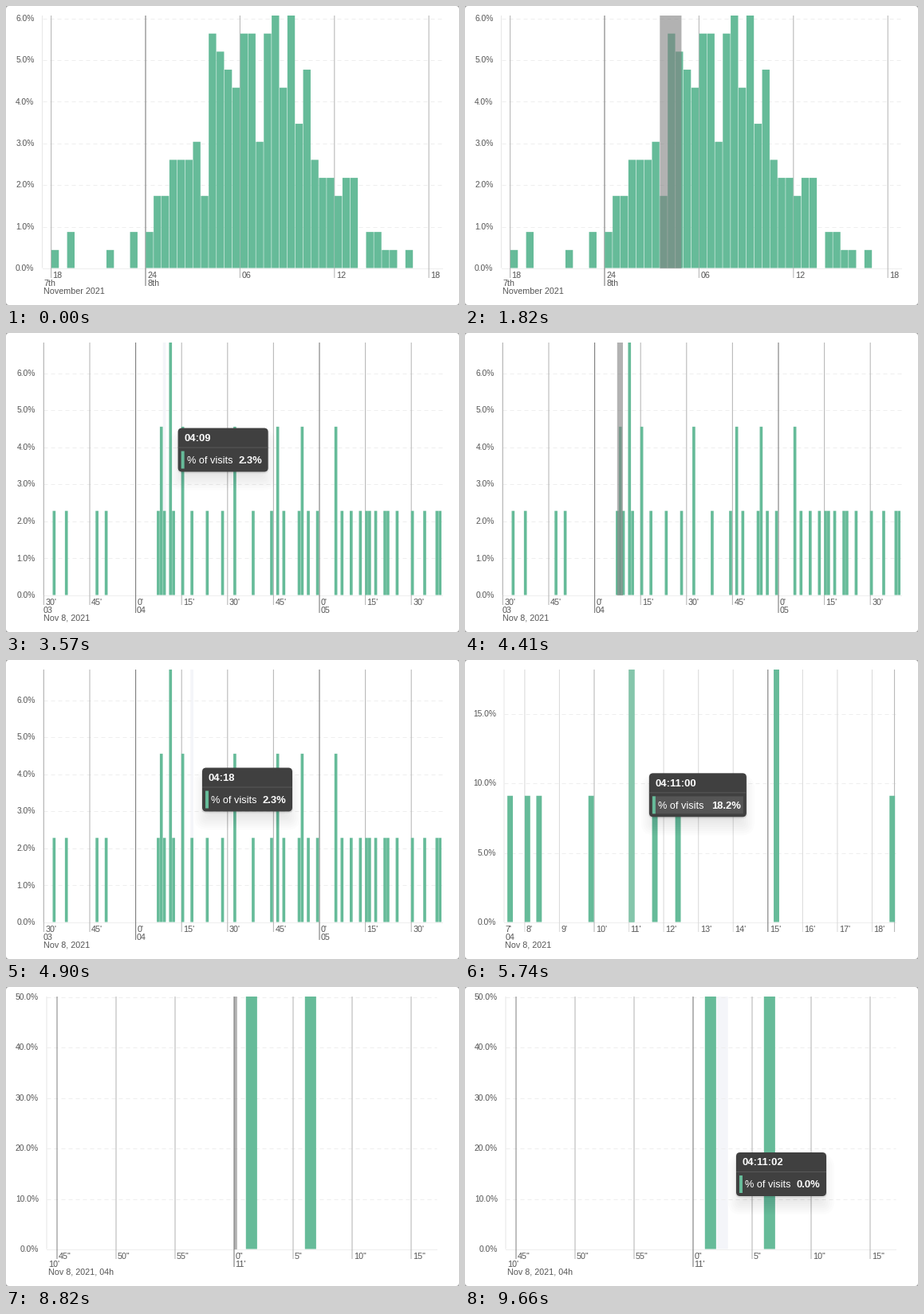
A matplotlib script that plays this animation: 568 by 376 pixels, repeating every 9940 ms.

```python
import math

import numpy as np
import matplotlib.pyplot as plt
from matplotlib.animation import FuncAnimation
from matplotlib.collections import LineCollection
from matplotlib.patches import FancyBboxPatch, Rectangle

W, H, DPI = 568, 376, 100
STEP, FRAMES = 70, 142
PX = 72 / DPI
TOP, BASE = 12, 329.5
GREEN, HOVER, BAND = "#66bb99", "#85c6ab", "#f4f5f9"
LIGHT, MID, DARK = "#dcdcdc", "#b9b9b9", "#7c7c7c"

plt.rcParams["font.family"] = "Liberation Sans"
fig = plt.figure(figsize=(W / DPI, H / DPI), dpi=DPI, facecolor="#a0a0a0")
ax = fig.add_axes([0, 0, 1, 1])
ax.set_xlim(0, W)
ax.set_ylim(H, 0)
ax.axis("off")


def rect(x, y, w, h, color, z, alpha=None):
    return ax.add_patch(Rectangle((x, y), w, h, fc=color, lw=0, zorder=z,
                                  alpha=alpha, snap=False))


def rounded(x, y, w, h, r, color, z, alpha=None):
    style = f"round,pad=0,rounding_size={r}"
    return ax.add_patch(FancyBboxPatch((x, y), w, h, boxstyle=style, fc=color,
                                       lw=0, zorder=z, alpha=alpha))


def text(x, y, s, size=10.7, color="#555555", z=6, **kw):
    return ax.text(x, y, s, fontsize=size * PX, color=color, zorder=z,
                   va="baseline", **kw)


class View:
    """One zoom level: bin 0 starts at x0, each bin is w wide and step seconds long."""

    def __init__(self, x0, w, start, step, visits, left, right, ytick, ticks, notes):
        self.x0, self.w, self.start, self.step = x0, w, start, step
        self.counts = dict(zip(*np.unique(visits, return_counts=True)))
        self.total, self.peak = len(visits), max(self.counts.values())
        self.art = [self.bar(i, GREEN, 3) for i in self.counts]
        self.draw_axes(left, right, ytick, ticks, notes)

    def draw_axes(self, left, right, ytick, ticks, notes):
        add = self.art.append
        gap = ytick / 100 * self.total / self.peak * (BASE - TOP)
        for k in range(int((BASE - TOP) / gap + 1e-6) + 1):
            y = BASE - k * gap
            add(text(left - 10, y + 3.6, f"{k * ytick:.1f}%", 10.3, ha="right"))
            add(ax.plot([left, right], [math.floor(y) + 0.5] * 2, color="#eeeeee",
                        lw=PX, ls=(0, (5, 4)) if k else "-", zorder=1)[0])
        lines = [(left, "", "#e9e9e9", BASE)] + ticks
        add(ax.add_collection(LineCollection(
            [[(x, TOP), (x, end)] for x, _, _, end in lines],
            colors=[color for _, _, color, _ in lines],
            linewidths=1.1 * PX, zorder=2, snap=False)))
        for x, label, *_ in ticks:
            add(text(x + 2, 342, label))
        for x, row, label in notes:
            add(text(x, 342 + 9.9 * row, label))

    def top(self, i):
        return BASE - (BASE - TOP) * self.counts.get(i, 0) / self.peak

    def bar(self, i, color, z):
        y = self.top(i)
        return rect(self.x0 + i * self.w, y, self.w * 0.95, BASE - y, color, z)

    def index(self, x):
        return math.floor((x - self.x0) / self.w)

    def clock(self, i):
        s = int(self.start * 60 + i * self.step) % 86400
        out = f"{s // 3600:02d}:{s // 60 % 60:02d}"
        return out if self.step >= 60 else out + f":{s % 60:02d}"

    def share(self, i):
        return f"{100 * self.counts.get(i, 0) / self.total:.1f}%"

    def show(self, on):
        for a in self.art:
            a.set_visible(on)


def tick(x, label, major, color=MID):
    return (x, label, DARK, 352) if major else (x, label, color, 342)


# Visits in ten-second bins from 04:07:30; the hour view reuses them by minute
TENS = [0, 3, 5, 14, 21, 21, 25, 29, 46, 46, 66]
OTHERS = [3, 7, 17, 20, 53, 58, 62, 62, 68, 74, 76, 76, 78, 83, 84, 84, 86, 89, 95, 95,
          97, 100, 103, 105, 106, 108, 111, 112, 115, 120, 124, 128, 129]


def day_view():
    per_bin = [1, 0, 2, 0, 0, 0, 0, 1, 0, 0, 2, 0, 2, 4, 4, 6, 6, 6, 7, 4, 13, 12, 11,
               10, 13, 13, 7, 13, 14, 10, 14, 8, 11, 6, 5, 5, 4, 5, 5, 0, 2, 2, 1, 1, 0, 1]
    visits = np.repeat(range(len(per_bin)), per_bin)
    ticks = [tick(56.6 + 118.4 * k, f"{(12 + 6 * k) % 24 + 6:02d}", k == 1)
             for k in range(5)]
    notes = [(47, 1, "7th"), (177, 1, "8th"), (47, 2, "November 2021")]
    return View(56.9, 9.865, 18 * 60, 1800, visits, 45.5, 547, 1, ticks, notes)


def hour_view():
    visits = OTHERS + [(225 + i) // 6 for i in TENS]
    ticks = [tick(47.4 + 57.6 * k, f"{(30 + 15 * k) % 60}'", k % 4 == 2)
             for k in range(9)]
    notes = [(47, 1, "03"), (164, 1, "04"), (394.5, 1, "05"), (47, 2, "Nov 8, 2021")]
    return View(47, 3.84, 210, 60, visits, 47, 547, 1, ticks, notes)


def minute_view():
    ticks = [(162 + 43.56 * (m - 10), f"{m}'", {10: MID, 15: DARK}.get(m, LIGHT), 342)
             for m in range(8, 19)]
    ticks.append((538.5, "", MID, 342))
    notes = [(50.5, 0, "7'"), (50.5, 1, "04"), (50.5, 2, "Nov 8, 2021")]
    return View(53.1, 7.26, 247.5, 10, TENS, 49, 540, 5, ticks, notes)


def second_view():
    ticks = [tick(64 + 74 * k, f'{(45 + 5 * k) % 60}"', k == 3, MID if k else "#8c8c8c")
             for k in range(7)]
    notes = [(53, 1, "10'"), (287.5, 1, "11'"), (53, 2, "Nov 8, 2021, 04h")]
    return View(286, 14.8, 251, 1, [1, 6], 51, 540, 10, ticks, notes)


class Stage:
    """Hover with a tooltip, drag a brush, release, then zoom into the next view."""

    def __init__(self, view, hover, move, hide, press, release, zoom, path):
        self.view, self.hover, self.move, self.hide = view, hover, move, hide
        self.press, self.release, self.zoom = press, release, zoom
        self.path = np.array(path)

    def pointer(self, t):
        a, b, c = self.path
        if t < self.press:
            return a + (b - a) * ease(t, self.move, self.hide - 2 * STEP, 2.6)
        return b + (c - b) * ease(t, self.press, self.release - 2 * STEP)

    def tip(self, t):
        return self.hover <= t < self.hide or t >= self.release

    def brush(self, t):
        return self.press < t < self.release


def ease(t, t0, t1, power=1):
    u = min(max((t - t0) / max(t1 - t0, 1), 0), 1)
    return 1 - (1 - u) ** power


rounded(0, 0, W, H, 4, "white", 0)
STAGES = [
    Stage(day_view(), 1120, 1400, 1400, 1540, 2100, 2450,
          [(241, 118.5), (244.3, 119), (285, 128)]),
    Stage(hour_view(), 2660, 2940, 4130, 4340, 4900, 5250,
          [(284, 128.5), (190.8, 150), (234, 163)]),
    Stage(minute_view(), 5600, 5600, 6160, 6370, 7000, 7490,
          [(234, 165.5), (194, 177), (218, 180.5)]),
    Stage(second_view(), 8750, 8750, 8750, 8750, 9660, 9940,
          [(286, 234), (286, 234), (328, 235.5)]),
]

live = []


def tooltip(x, y, title, value, active):
    w, h = (113 if len(value) < 5 else 122), 55
    for k in range(8):
        g = 10 - 2.6 * k
        live.append(rounded(x - g, y + 13 - g, w + 2 * g, h + 2 * g, max(g, 0) + 6,
                            "black", 10, 0.011))
    live.append(rounded(x - 1, y, w + 2, h + 2, 6, "black", 10, 0.08))
    live.append(rounded(x, y, w, h, 5, "#404040", 11))
    live.append(rect(x, y + 24, w, 1, "#595959", 12))
    if active:
        live.append(rect(x + 4, y + 29, w - 8, 22, "#555555", 12))
    live.append(rect(x + 4, y + 29, 4, 22, GREEN, 13))
    live.append(text(x + 8, y + 16.5, title, 13, "white", 14, weight="bold"))
    live.append(text(x + 11, y + 44.3, "% of visits", 12.7, "white", 14))
    live.append(text(x + w - 7.3, y + 44.3, value, 13, "white", 14,
                     weight="bold", ha="right"))


def update(n):
    t = n * STEP
    while live:
        live.pop().remove()
    stage = next(s for s in STAGES if t < s.zoom)
    for s in STAGES:
        s.view.show(s is stage)
    view = stage.view
    x, y = stage.pointer(t)

    if stage.brush(t):
        x0 = stage.path[1][0]
        live.append(rect(x0, TOP, x - x0, BASE + 0.5 - TOP, "#808080", 8, 0.6))

    if stage.tip(t):
        i = view.index(x)
        live.append(rect(view.x0 + i * view.w, TOP, view.w * 0.95, BASE - TOP, BAND, 0.5))
        active = y > view.top(i)
        if active:
            live.append(view.bar(i, HOVER, 4))
        # the tooltip trails the pointer by one step
        tx, ty = stage.pointer(t - STEP)
        tooltip(tx + 12, ty - 27.5, view.clock(i), view.share(i), active)
    return []


anim = FuncAnimation(fig, update, frames=FRAMES, interval=STEP, repeat=True,
                     repeat_delay=0, blit=False)
plt.show()
```
